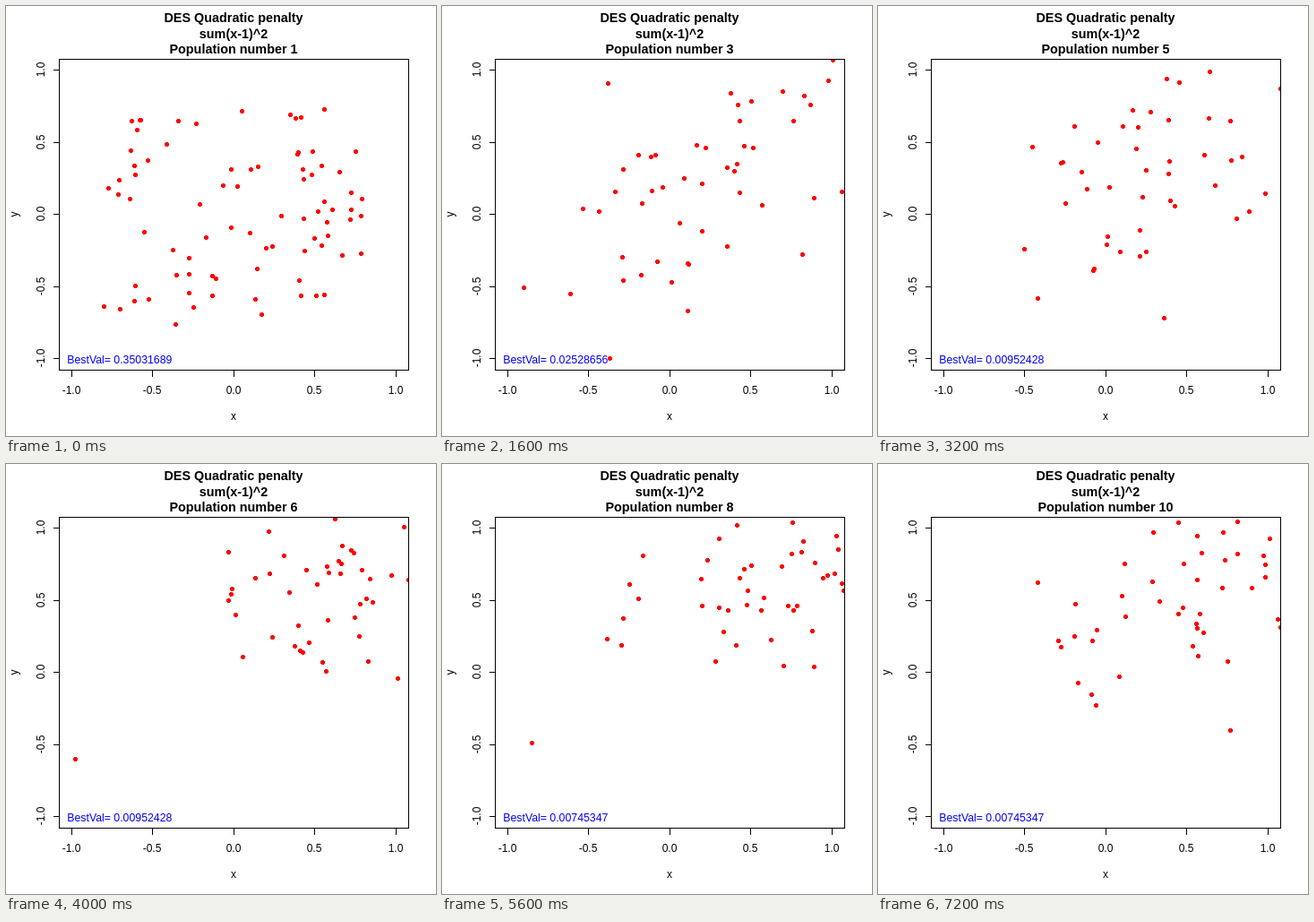
An HTML page that plays this animation: 480 px wide and 480 px high, repeating every 8000 ms.

```html
<!DOCTYPE html>
<html lang="en">
<head>
<meta charset="utf-8">
<title>Population scatter</title>
<style>
  html, body { margin: 0; width: 100%; height: 100%; overflow: hidden; background: #fff; }
  svg { display: block; width: 100vw; height: 100vh; }
  text { font: 12px "Liberation Sans", Arial, sans-serif; text-anchor: middle; }
  .title text { font-size: 14.4px; font-weight: bold; }
  #best { font-size: 12.3px; text-anchor: start; fill: #00f; }
  .lines { fill: none; stroke: #000; shape-rendering: crispEdges; }
</style>
</head>
<body>
<svg viewBox="0 0 480 480">
  <clipPath id="plot"><rect x="59" y="59" width="391" height="348"/></clipPath>
  <g class="title">
    <text x="254" y="18">DES Quadratic penalty</text>
    <text x="254" y="36">sum(x-1)^2</text>
    <text x="254" y="53" id="count"></text>
  </g>
  <g clip-path="url(#plot)">
    <path id="dots" fill="#f00" shape-rendering="crispEdges"/>
  </g>
  <path id="frame" class="lines"/>
  <g id="labels"></g>
  <text id="best" x="68.3" y="399"></text>
</svg>
<script>
const STEP = 800;
const EDGE = 1.08;
const $ = id => document.getElementById(id);

// Plot units to whole pixels
const px = x => Math.round(253.8 + 180.8 * x);
const py = y => Math.round(232.3 - 161 * y);

function label(text, x, y, turned) {
  const el = document.createElementNS("http://www.w3.org/2000/svg", "text");
  el.setAttribute("transform", `translate(${x} ${y})` + (turned ? " rotate(-90)" : ""));
  el.textContent = text;
  $("labels").append(el);
}

function drawAxes() {
  let d = "M59.5 59.5H449.5V406.5H59.5Z";
  for (let v = -1; v <= 1; v += 0.5) {
    const x = px(v), y = py(v), name = v.toFixed(1);
    d += `M${x + 0.5} 406V414M53 ${y + 0.5}H59`;
    label(name, x, 433);
    label(name, 43, y, true);
  }
  label("x", 254, 462);
  label("y", 13, 232.5, true);
  $("frame").setAttribute("d", d);
}

function random(seed) {
  let s = seed * 2654435761 % 4294967296;
  return () => {
    s = (s * 1664525 + 1013904223) % 4294967296;
    return s / 4294967296;
  };
}

// Best value and outermost points of each population
const pops = [
  ["0.35031689", [[-0.8, -0.64], [-0.36, -0.76], [0.56, 0.73], [0.79, 0.11]]],
  ["0.02528656", [[-0.85, -0.82], [-0.27, -0.96], [-0.35, 0.91], [0.46, 0.98]]],
  ["0.02528656", [[-0.9, -0.51], [-0.37, -1], [-0.38, 0.91], [1.01, 1.07]]],
  ["0.01418372", [[-0.6, 0.1], [0.1, -0.75], [1.02, 0.75]]],
  ["0.00952428", [[-0.5, -0.24], [-0.45, 0.47], [0.36, -0.72], [EDGE, 0.87]]],
  ["0.00952428", [[-0.98, -0.6], [EDGE, 0.64]]],
  ["0.00952428", [[-0.43, 0.28], [-0.41, -0.22], [0.36, 0.94], [1.03, 0.88]]],
  ["0.00745347", [[-0.85, -0.49], [1.04, 0.85]]],
  ["0.00745347", [[-0.4, -0.27], [-0.13, 0.76], [0.41, 1.01], [EDGE, 0.64]]],
  ["0.00745347", [[-0.42, 0.62], [-0.06, -0.23], [0.77, -0.4], [EDGE, 0.31]]]
];

// The first population fills a square; later ones gather towards (1, 1)
function scatter(outer, k) {
  const rnd = random(k + 1);
  const bell = () => 2 * (rnd() + rnd() + rnd()) - 3;
  const near = 1 - Math.exp(-k / 4);
  const count = Math.round(44 + 36 * Math.exp(-k));
  const left = Math.min(...outer.map(p => p[0]));
  const low = Math.min(...outer.map(p => p[1]));
  const pts = [...outer];
  while (pts.length < count) {
    const u = bell(), v = bell();
    const x = k ? 0.12 + 0.5 * near + (0.55 - 0.19 * near) * u : 1.6 * rnd() - 0.8;
    const y = k ? 0.01 + 0.62 * near + (0.57 - 0.26 * near) * (0.5 * u + 0.86 * v) : 1.5 * rnd() - 0.77;
    if (x > left && x < EDGE && y > low && y < EDGE) pts.push([x, y]);
  }
  return pts;
}

// A round dot five pixels wide
const dot = ([x, y]) => `M${px(x) - 1} ${py(y) - 2}h3v1h1v3h-1v1h-3v-1h-1v-3h1z`;
const paths = pops.map(([, outer], k) => scatter(outer, k).map(dot).join(""));

let shown = -1;

function render(time) {
  const k = Math.floor(time / STEP) % pops.length;
  if (k === shown) return;
  shown = k;
  $("count").textContent = `Population number ${k + 1}`;
  $("best").textContent = `BestVal= ${pops[k][0]}`;
  $("dots").setAttribute("d", paths[k]);
}

drawAxes();
render(0);

const start = performance.now();
function tick() {
  render(performance.now() - start);
  requestAnimationFrame(tick);
}
requestAnimationFrame(tick);
</script>
</body>
</html>
```
